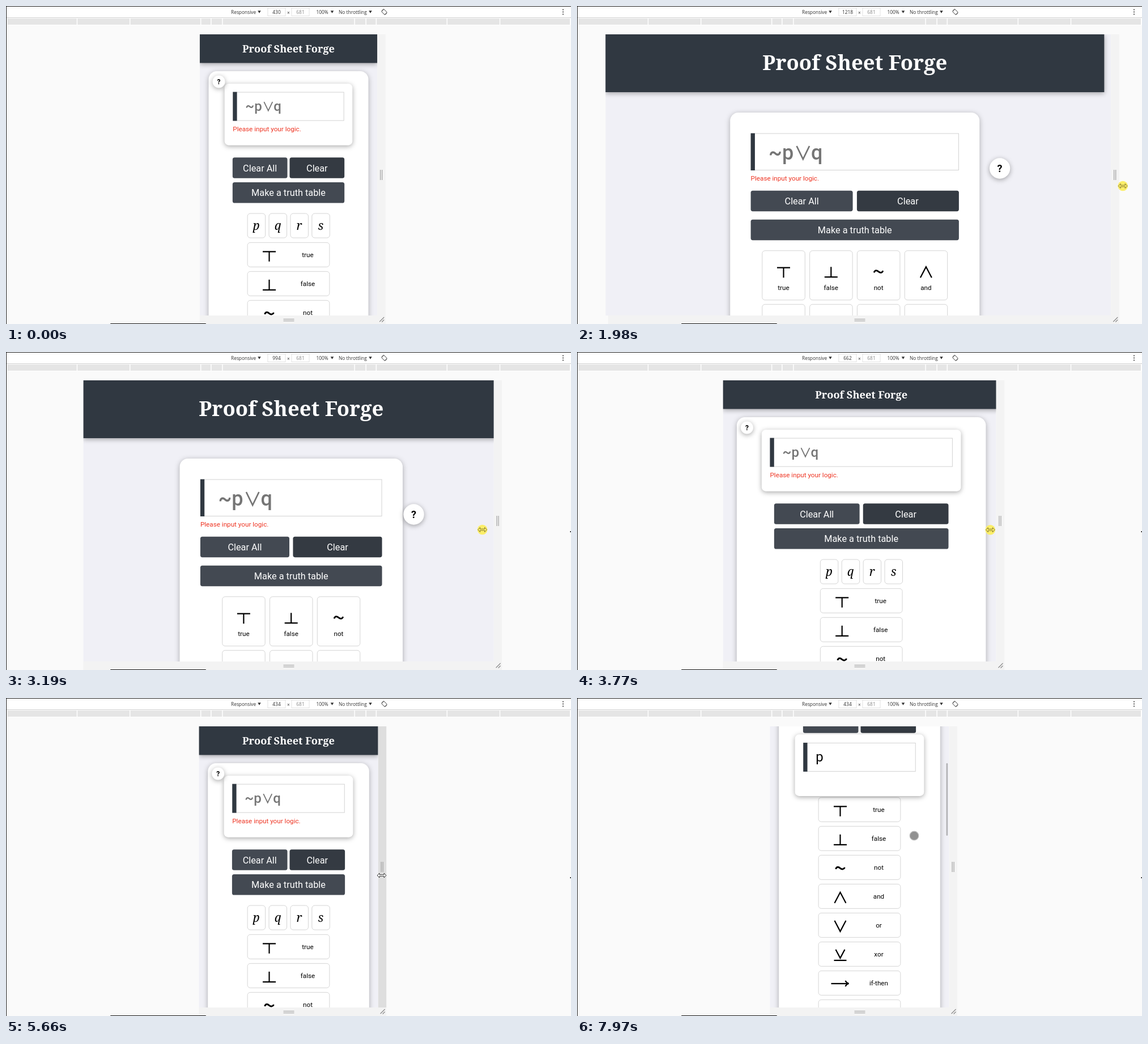
Write an HTML page that moves like this. It is 997x561 px and loops after 8000 ms.

```html
<!DOCTYPE html>
<html lang="en">
<head>
<meta charset="utf-8">
<title>Responsive logic page</title>
<style>
html, body { margin: 0; width: 100%; height: 100%; overflow: hidden; background: #fafafa; }
svg { display: block; width: 997px; height: 561px; font-family: Roboto, sans-serif; }
.ui { font-family: "Open Sans", sans-serif; font-size: 8.4px; fill: #333; }
.title { font-family: "Noto Serif", serif; font-weight: 700; fill: #fff; }
.var { font-family: "Noto Serif", serif; font-style: italic; font-size: 21px; }
.btn { font-size: 16.3px; fill: #fff; }
.small { font-size: 11.7px; }
.mid { text-anchor: middle; }
.line { fill: none; stroke: #000; stroke-width: 2.2; }
.key { fill: #fff; stroke: #d4d4d4; }
.lift { filter: drop-shadow(0 2px 4px rgba(0,0,0,.34)); }
.card { filter: drop-shadow(0 2px 5px rgba(0,0,0,.3)); }
</style>
</head>
<body>
<svg id="stage" viewBox="0 0 997 561" xmlns="http://www.w3.org/2000/svg"></svg>
<script>
const LOOP = 8000, CX = 498.5, S = 0.7286, TOP = 50, BOTTOM = 546;
const TITLE = 'Proof Sheet Forge';
const stage = document.getElementById('stage');

// [start, end, number of pictures]
const bursts = [[280, 1010, 12], [1090, 1840, 11], [1910, 2390, 8], [2710, 3500, 11],
  [3560, 4320, 12], [4390, 4390, 1], [4650, 5270, 10], [5660, 6410, 11],
  [6480, 7280, 12], [7350, 7770, 7], [7970, 7970, 1]];

const viewWidth = [[0, 430], [1390, 430], [1540, 468], [1840, 1033], [1979, 1218], [2390, 1327],
  [2710, 1327], [3184, 994], [3500, 824], [4320, 325], [4390, 320], [4650, 320], [5270, 434]];
const layoutLag = [[1390, 0], [1540, -30], [1840, -30], [1979, -10], [2390, 0],
  [2710, 0], [3184, 13], [3500, 13], [4320, 0]];
const pageShift = [[1840, 0], [1979, -4.6], [2390, 0]];
const lead = [[1300, 0], [1540, 36], [1840, 51], [1979, 14], [2390, 0], [2710, 0],
  [3184, -27], [3500, -24], [4320, -3], [4390, 0]];
const dragY = [[1090, 310], [1540, 310], [1979, 317.5], [2710, 317], [3184, 313.5], [4390, 314], [5270, 313]];
const freeX = [[280, 736], [1010, 662], [5660, 663], [6410, 441], [6700, 441], [7280, 600], [7770, 595]];
const freeY = [[280, 350], [1010, 310], [5660, 313], [6410, 388], [6700, 388], [7280, 494], [7350, 485], [7770, 243]];

const symbols = {
  true: 'M-11.5-5.5H11.5M0-5.5V12',
  false: 'M-11.5 11H11.5M0-7V11',
  not: 'M-8 3C-6-2-3-1 0 1.5S6 4 8 0',
  and: 'M-10 12L0-7L10 12',
  or: 'M-10-8L0 11L10-8',
  xor: 'M-8-8L0 7L8-8M-11 11H11',
  'if-then': 'M-16 1H14M9-4Q11 0 15 1Q11 2 9 6',
  iff: ''
};

function at(track, t) {
  if (t <= track[0][0]) return track[0][1];
  for (let i = 1; i < track.length; i++) {
    const [t0, a] = track[i - 1], [t1, b] = track[i];
    if (t <= t1) return a + (b - a) * (t - t0) / (t1 - t0);
  }
  return track[track.length - 1][1];
}

function snap(t) {
  let held = 0;
  for (const [a, b, n] of bursts) {
    if (t < a) break;
    const step = (b - a) / (n - 1) || 1;
    held = Math.round(a + step * Math.min(n - 1, Math.floor((t - a) / step + 1e-6)));
  }
  return held;
}

const rect = (x, y, w, h, fill, r = 0, extra = '') =>
  `<rect x="${x}" y="${y}" width="${w}" height="${h}" rx="${r}" fill="${fill}" ${extra}/>`;
const circle = (x, y, r, fill, extra = '') => `<circle cx="${x}" cy="${y}" r="${r}" fill="${fill}" ${extra}/>`;
const text = (x, y, s, cls = '', extra = '') => `<text x="${x}" y="${y}" class="${cls}" ${extra}>${s}</text>`;
const path = (d, color, w, extra = '') =>
  `<path d="${d}" fill="none" stroke="${color}" stroke-width="${w}" ${extra}/>`;
const symbol = (x, y, name) =>
  `<path class="line" d="${symbols[name]}" transform="translate(${x} ${y})" ${name === 'not' ? 'style="stroke-width:2.8"' : ''}/>`;

function chrome(w) {
  let s = rect(0, 0, 997, 561, '#fafafa') + rect(0, 0, 997, 20, '#fff') + rect(0, 20, 997, 1, '#cfcfcf');
  s += rect(0, 21, 997, 13, '#fff') + rect(2, 22, 993, 11, '#e5e5e5');
  for (const d of [320, 375, 425, 768, 1024])
    for (const side of [-1, 1]) s += rect(CX + side * d * S / 2 - .75, 21, 1.5, 13, '#fff');
  const arrow = x => `<path d="M${x - 2.8} 8.3h5.6l-2.8 4.5z" fill="#333"/>`;
  const box = x => rect(x, 3.5, 31, 14, '#fff', 0, 'stroke="#e2e2e2"');
  s += text(397, 14, 'Responsive', 'ui') + arrow(447) + box(462) + box(504);
  s += text(477.5, 14, Math.round(w), 'ui mid') + text(498.5, 15, '×', 'ui mid');
  s += text(519.5, 14, '681', 'ui mid', 'style="fill:#888"');
  s += text(547.5, 14, '100%', 'ui') + arrow(575.5) + text(587, 14, 'No throttling', 'ui') + arrow(643);
  s += rect(664.5, 6.5, 6, 8, 'none', 1, 'stroke="#555" transform="rotate(-45 667.5 10.5)"');
  s += path('M663 9a5 5 0 0 1 4-3.5M672 12a5 5 0 0 1-4 3.5', '#555', .9);
  for (const y of [6.5, 10.5, 14.5]) s += circle(983, y, 1.1, '#444');
  return s;
}

function inputBox(x, y, w, h, k, typed) {
  const tx = x + (k > 1 ? 31.5 : 22), base = y + (k > 1 ? 46.5 : 33.5);
  let s = rect(x + .5, y + .5, w - 1, h - 1, '#fff', 0, 'stroke="#d2d2d2"') + rect(x, y, 7.3, h, '#303841');
  const font = `style="font-size:${24 * k}px"`;
  if (typed) return s + text(tx, base, 'p', '', font);
  const gray = `${font} fill="#757575" font-weight="500"`;
  s += text(tx, base, '~p', '', gray) + text(tx + 50 * k, base, 'q', '', gray);
  return s + path(`M${tx + 33 * k} ${base - 16 * k}l${7.5 * k} ${15.5 * k}l${7.5 * k} ${-15.5 * k}`, '#757575', 1.8 * k);
}

function button(x, y, w, label, fill) {
  return rect(x, y, w, 36.5, fill, 3.6) + text(x + w / 2, y + 24.3, label, 'btn mid');
}

function buttons(x, w, y1, y2) {
  const half = w * .49;
  return button(x, y1, half, 'Clear All', '#434952') + button(x + w - half, y1, half, 'Clear', '#343a42') +
    button(x, y2, w, 'Make a truth table', '#434952');
}

const errorText = (x, y) => text(x, y, 'Please input your logic.', 'small', 'fill="#ee3422"');

function header(x, w, h, size, base) {
  return `<g class="lift">${rect(x, TOP, w, h, '#303841')}</g>` +
    text(x + w / 2, base, TITLE, 'title mid', `style="font-size:${size}px"`);
}

function help(x, y, r, size) {
  return `<g class="lift">${circle(x, y, r, '#fff')}</g>` +
    text(x, y + size * .36, '?', 'mid', `style="font-size:${size}px;font-weight:700"`);
}

function mobilePage(x, w, scroll, typed) {
  const mid = x + w / 2, card = Math.max(w * .9, 300 * S), cl = mid - card / 2;
  const rowW = 200 * S, left = mid - rowW / 2, bw = card * .8, bl = mid - bw / 2;
  let s = header(x, w, 50.5, 18.2, 81.5);
  s += `<g class="card">${rect(cl, 115, card, 1850, '#fff', 14.6)}</g>`;
  s += buttons(mid - card * .35, card * .7, 267.3, 311);
  [...'pqrs'].forEach((c, i) => {
    const kx = left + i * 37.9;
    s += rect(kx + .5, 366, 31.5, 43, '#fff', 5, 'class="key"') + text(kx + 16, 395, c, 'var mid');
  });
  Object.keys(symbols).forEach((name, i) => {
    const y = 417.3 + i * 51;
    s += rect(left + .5, y, rowW - 1, 43, '#fff', 5, 'class="key"');
    s += symbol(mid - 34, y + 21.5, name) + text(mid + 34, y + 25.7, name, 'small mid');
  });
  s = `<g transform="translate(0 ${-scroll})">${s}</g>`;
  const by = Math.max(64.3, 137 - scroll);
  s += `<g class="lift">${rect(bl, by, bw, 108.7, '#fff', 7.3)}</g>`;
  s += inputBox(bl + 14.6, by + 14.6, bw - 29.2, 51, 1, typed);
  if (!typed) s += errorText(bl + 14.6, by + 84);
  return s + help(cl + 18, 133.5 - scroll, 11, 12);
}

function desktopPage(x, w) {
  const mid = x + w / 2, card = Math.max(w * .5, 540 * S), cl = mid - card / 2;
  const il = cl + 36.4, iw = card - 72.8, cell = 83.8, cols = Math.floor(iw / cell);
  let s = header(x, w, 102, 36.4, 112.5);
  s += `<g class="card">${rect(cl, 188, card, 1200, '#fff', 14.6)}</g>`;
  s += inputBox(il, 224.5, iw, 65.5, 1.5) + errorText(il, 308);
  s += buttons(il, iw, 325.7, 376.7);
  Object.keys(symbols).forEach((name, i) => {
    const kx = mid - cols * cell / 2 + (i % cols) * cell + 3.65, ky = 431.7 + Math.floor(i / cols) * 94.6;
    s += rect(kx + .5, ky, 75.5, 87, '#fff', 5, 'class="key"');
    s += symbol(kx + 38.2, ky + 35.5, name) + text(kx + 38.2, ky + 69, name, 'small mid');
  });
  return s + help(x + w * .77 + 18.2, 286.5, 18.2, 18);
}

function frameStrips(left, right, hover) {
  let s = rect(right, TOP, 14.6, BOTTOM - TOP, hover ? '#dedede' : '#f3f3f3');
  s += rect(left, BOTTOM, right - left + 14.6, 15, '#f3f3f3');
  s += path(`M${right + 5.5} 289v18m3 0v-18M489.5 552.5h19m0 3h-19`, '#999', 1.1);
  return s + path(`M${right + 4} 557l8-8m0 4.5l-4 4`, '#888', 1.1);
}

function pointer(t, right) {
  if (t < 280) return '';
  const dragging = t >= 1090 && t < 5660;
  const x = dragging ? right + 7 + at(lead, t) : at(freeX, t);
  const y = at(dragging ? dragY : freeY, t);
  if (!dragging && x < right) {
    const pressed = (t >= 6540 && t < 6680) || (t >= 7350 && t < 7970);
    return circle(x, y, 7.8, pressed ? '#666' : '#888', 'fill-opacity=".92" stroke="#bbb" stroke-width="1.2"');
  }
  if (!dragging && x > right + 15)
    return `<path d="M${x} ${y}v13l3-3l2.2 5l2-1l-2.2-4.6h4z" fill="#fff" stroke="#222" stroke-width=".9"/>`;
  const arrows = `M${x - 8} ${y}l4-4v2.7h8v-2.7l4 4l-4 4v-2.7h-8v2.7z`;
  return (dragging ? circle(x, y, 8.8, '#fbee6a') : '') +
    `<path d="${arrows}" fill="${dragging ? '#fbee6a' : '#fff'}" stroke="${dragging ? '#75682a' : '#222'}" stroke-width=".9"/>`;
}

function draw(t) {
  const w = at(viewWidth, t), left = CX - w * S / 2, right = CX + w * S / 2;
  const layout = w + at(layoutLag, t), x = left + at(pageShift, t);
  const p = Math.min(1, Math.max(0, (t - 7350) / 420)), scroll = 242 * p;
  const hover = (t >= 870 && t < 1700) || (t >= 5000 && t < 5730);
  let s = chrome(w) + frameStrips(left, right, hover);
  s += `<clipPath id="view"><rect x="${x}" y="${TOP}" width="${right - x}" height="${BOTTOM - TOP}"/></clipPath>`;
  s += `<g clip-path="url(#view)">${rect(x, TOP, right - x, BOTTOM - TOP, '#f0f0f6')}`;
  s += layout < 768 ? mobilePage(x, layout * S, scroll, t >= 6620) : desktopPage(x, layout * S);
  if (t >= 7350) s += rect(right - 5, 52 + scroll * .26, 2.6, 128, '#b0b0b3', 1.3);
  s += '</g>' + pointer(t, right);
  if (t >= 2390) s += rect(995.5, 316, 1.5, 2, '#111');
  s += rect(0, 0, 997, 1, '#222') + rect(0, 0, 1, 561, '#222') + rect(184, 560, 169, 2, '#111', 1);
  stage.innerHTML = s;
}

let shown = -1;
function tick(now) {
  const t = snap((now - start) % LOOP);
  if (t !== shown) draw(shown = t);
  requestAnimationFrame(tick);
}
const start = performance.now();
draw(shown = 0);
requestAnimationFrame(n => tick(Math.max(n, start)));
</script>
</body>
</html>
```
